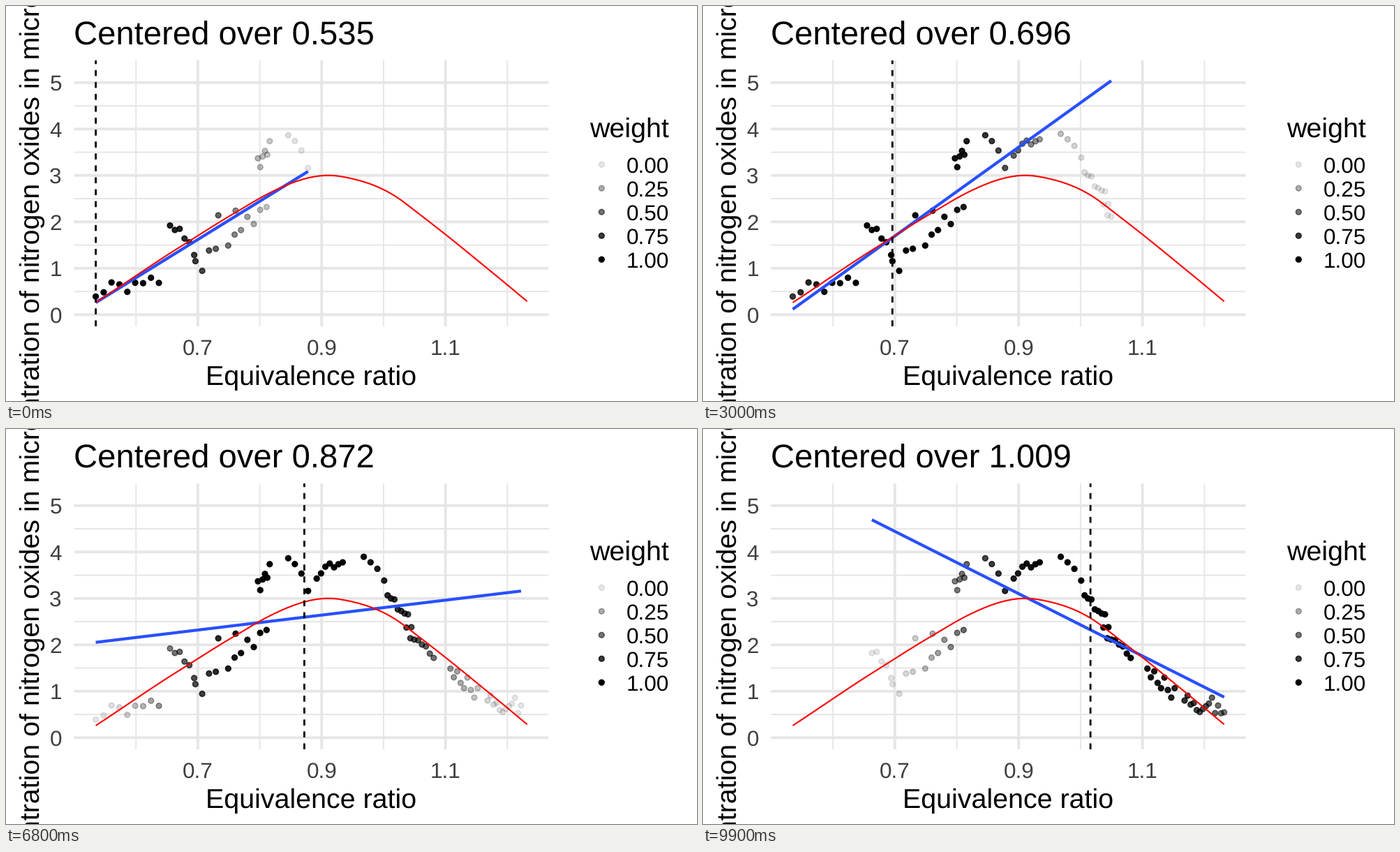
A matplotlib script that plays this animation: 990 by 566 pixels, repeating every 10 s.

```python
import numpy as np
import matplotlib.pyplot as plt
from matplotlib.animation import FuncAnimation

W, H, DPI = 990, 566, 64
FRAMES, INTERVAL = 100, 100
LEFT, RIGHT, TOP, BOTTOM = 97.5, 777.5, 78, 459
BASE = 39.35           # base text size in pixels
RADIUS = 0.355         # half width of the weighting window
SPAN = 0.75            # share of points behind each value of the red curve
GRID, TICK, BLUE = "#E6E6E6", "#404040", "#2850FF"

plt.rcParams.update({
    "font.family": "Liberation Sans",
    "text.hinting": "none",
    "path.snap": False,
})


def run(x0, y0, x1, y1, n):
    """A short row of n readings from one point to another."""
    return np.c_[np.linspace(x0, x1, n), np.linspace(y0, y1, n)]


def readings():
    """Readings that rise to a peak near 0.93 and fall again, with some noise."""
    pts = np.vstack([
        run(0.535, 0.45, 0.637, 0.83, 9),
        run(0.655, 1.90, 0.694, 1.42, 6),
        run(0.696, 0.95, 0.729, 1.45, 4),
        run(0.733, 2.22, 0.761, 2.30, 2),
        run(0.749, 1.55, 0.811, 2.40, 7),
        run(0.797, 3.30, 0.816, 3.65, 6),
        run(0.846, 3.85, 0.878, 3.25, 4),
        run(0.892, 3.50, 0.934, 3.85, 7),
        run(0.968, 3.95, 0.990, 3.65, 3),
        run(1.001, 3.20, 1.045, 2.50, 9),
        run(1.037, 2.25, 1.081, 1.72, 8),
        run(1.108, 1.46, 1.152, 0.90, 9),
        run(1.168, 0.83, 1.232, 0.56, 14),
    ])
    pts[:, 1] += np.random.default_rng(4).normal(0, 0.09, len(pts))
    return pts[np.argsort(pts[:, 0])].T


ratio, nox = readings()

# Where the window stands after a given number of moves
MOVES = [0, 5, 11, 15, 22, 27, 31, 34, 40, 44, 49, 50]
STOPS = [0.535, 0.602, 0.684, 0.696, 0.765, 0.808,
         0.816, 0.872, 0.911, 0.977, 1.009, 1.016]


def center_at(move):
    return round(float(np.interp(move, MOVES, STOPS)), 3)


def px(v):
    return 274.9 + (np.asarray(v) - 0.7) * 886.8


def py(v):
    return 442.3 - np.asarray(v) * 66.5


def pt(pixels):
    return pixels * 72 / DPI


def tricube(center, radius):
    u = np.abs(ratio - center) / radius
    return np.where(u < 1, (1 - u ** 3) ** 3, 0)


def fit(w):
    """Weighted straight line as (slope, intercept)."""
    mx, my = np.average(ratio, weights=w), np.average(nox, weights=w)
    slope = np.sum(w * (ratio - mx) * (nox - my)) / np.sum(w * (ratio - mx) ** 2)
    return slope, my - slope * mx


def loess(xs):
    """Local linear smooth, blended with cubics between a few knots."""
    n = len(ratio)
    cuts = np.arange(n // 8, n, n // 8)
    knots = np.r_[ratio[0] - 0.0035,
                  (ratio[cuts - 1] + ratio[cuts]) / 2,
                  ratio[-1] + 0.0035]
    val, der = [], []
    for k in knots:
        reach = np.sort(np.abs(ratio - k))[int(n * SPAN) - 1]
        slope, icpt = fit(tricube(k, reach))
        val.append(icpt + slope * k)
        der.append(slope)
    val, der = np.array(val), np.array(der)
    i = np.clip(np.searchsorted(knots, xs) - 1, 0, len(knots) - 2)
    h = knots[i + 1] - knots[i]
    t = (xs - knots[i]) / h
    return ((1 + 2 * t) * (1 - t) ** 2 * val[i] + t * (1 - t) ** 2 * h * der[i]
            + t ** 2 * (3 - 2 * t) * val[i + 1] + t ** 2 * (t - 1) * h * der[i + 1])


def shade(w):
    """Black with opacity growing with weight."""
    rgba = np.zeros((len(w), 4))
    rgba[:, 3] = 0.1 + 0.9 * w
    return rgba


fig = plt.figure(figsize=(W / DPI, H / DPI), dpi=DPI, facecolor="white")
ax = fig.add_axes([0, 0, 1, 1])
ax.set_xlim(0, W)
ax.set_ylim(H, 0)
ax.axis("off")


def line(xs, ys, width, color, z, **kw):
    return ax.plot(xs, ys, lw=pt(width), color=color, zorder=z,
                   solid_capstyle="butt", dash_capstyle="butt", **kw)[0]


def label(x, y, s, size=1.0, color="black", ha="left", **kw):
    return ax.text(x, y, s, fontsize=pt(BASE * size), color=color, ha=ha,
                   va="baseline", **kw)


def dots(xs, ys, w):
    rgba = shade(w)
    return ax.scatter(xs, ys, s=pt(7.8) ** 2, facecolors=rgba, edgecolors=rgba,
                      linewidths=pt(1.42), zorder=3)


def grid(xs, ys, width, z):
    for v in ys:
        line([LEFT, RIGHT], [py(v)] * 2, width, GRID, z)
    for v in xs:
        line([px(v)] * 2, [TOP, BOTTOM], width, GRID, z)


grid([0.6, 0.8, 1.0, 1.2], np.arange(0.5, 5), 1.94, 1)
grid([0.7, 0.9, 1.1], range(6), 3.88, 2)

for v in range(6):
    label(79.8, py(v) + 11.4, str(v), 0.8, TICK, "right")
for v in (0.7, 0.9, 1.1):
    label(px(v), 499.8, str(v), 0.8, TICK, "center")

label((LEFT + RIGHT) / 2, 543, "Equivalence ratio", ha="center")
label(47.5, (TOP + BOTTOM) / 2,
      "Concentration of nitrogen oxides in micrograms/J",
      ha="center", rotation=90, rotation_mode="anchor")

label(836, 187.5, "weight")
levels = np.linspace(0, 1, 5)
rows = 227.2 + 34 * np.arange(5)
dots(np.full(5, 853.3), rows, levels)
for y, v in zip(rows, levels):
    label(888.7, y + 11.4, f"{v:.2f}", 0.8)

title = label(97, 54.5, "", 1.2)
cloud = dots(px(ratio), py(nox), np.ones_like(ratio))
local = line([], [], 4.27, BLUE, 4)
xs = np.linspace(ratio[0], ratio[-1], 80)
line(px(xs), py(loess(xs)), 2.13, "red", 5)
marker = line([], [], 2.8, "black", 6, dashes=(3.05, 3.05))


def update(i):
    # The plot moves on odd steps, the title follows one step later
    center = center_at((i + 1) // 2)
    title.set_text(f"Centered over {center_at(i // 2):g}")
    w = tricube(center, RADIUS)
    inside = w > 0
    cloud.set_offsets(np.c_[px(ratio[inside]), py(nox[inside])])
    rgba = shade(w[inside])
    cloud.set_facecolor(rgba)
    cloud.set_edgecolor(rgba)
    slope, icpt = fit(w)
    ends = ratio[inside][[0, -1]]
    local.set_data(px(ends), py(icpt + slope * ends))
    marker.set_data([px(center)] * 2, [BOTTOM, TOP])
    return title, cloud, local, marker


anim = FuncAnimation(fig, update, frames=FRAMES, interval=INTERVAL,
                     repeat=True, repeat_delay=0, blit=False)
plt.show()
```
